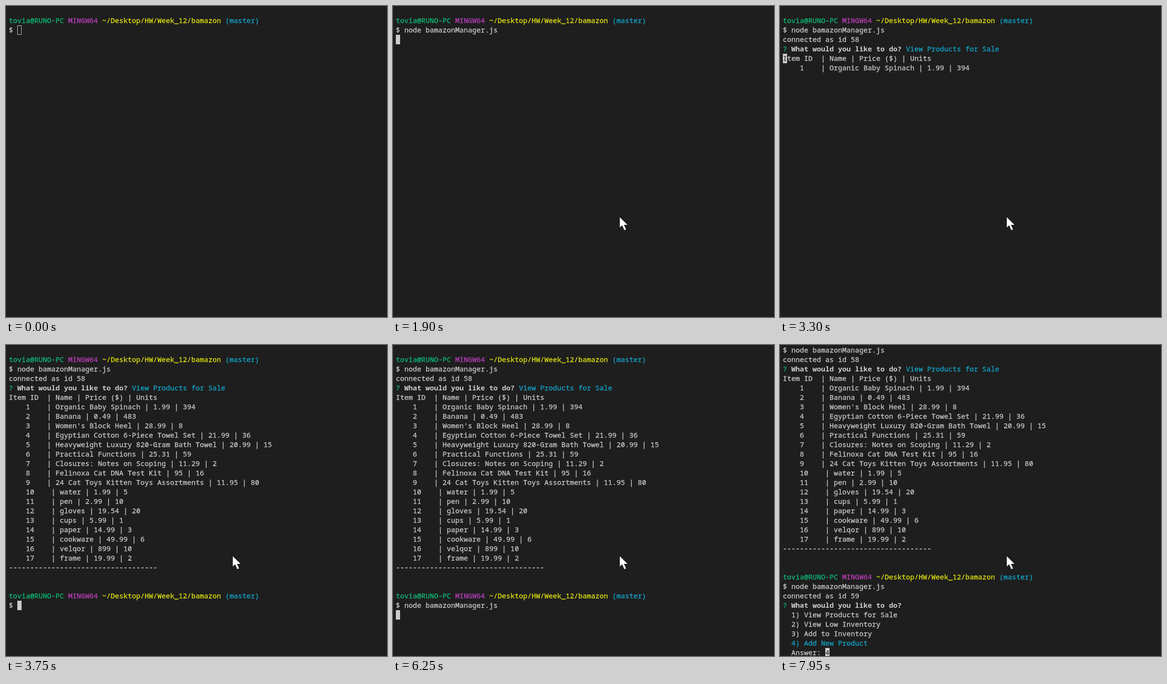
These frames come from a looping animation (808 by 658 pixels, 8 s). An HTML page:

```html
<!DOCTYPE html>
<html lang="en">
<head>
<meta charset="utf-8">
<title>Terminal session</title>
<style>
html, body { margin: 0; width: 100%; height: 100%; overflow: hidden; background: #1e1e1e; }
svg { display: block; width: 808px; height: 658px; }
text { font: 15px "Noto Sans Mono", "DejaVu Sans Mono", monospace; white-space: pre; stroke-width: .3px; }
.bold { font-weight: 700; stroke-width: 0; }
</style>
</head>
<body>
<svg viewBox="0 0 808 658">
  <rect width="808" height="658" fill="#1e1e1e"/>
  <g id="screen"></g>
  <rect id="caret"/>
  <text id="under" fill="#1e1e1e"></text>
  <path id="mouse" d="M0 0V21.5L5 17L9.6 27.3L13.2 25.8L8.8 16H16.2Z" fill="#fff"/>
</svg>
<script>
const LOOP = 8000, TICK = 50, CELL = 9, ROW = 20, LEFT = 6;
const WHITE = "#cccccc", GREEN = "#0dbc79", PURPLE = "#bc3fbc", YELLOW = "#e5e510", CYAN = "#11a8cd";
const $ = id => document.getElementById(id);

// A line is a list of [text, colour, bold] parts.
const plain = text => [[text, WHITE]];
const BLANK = plain("");
const PROMPT = [["tovia@RUNO-PC ", GREEN], ["MINGW64 ", PURPLE],
  ["~/Desktop/HW/Week_12/bamazon ", YELLOW], ["(master)", CYAN]];
const COMMAND = "$ node bamazonManager.js";
const QUESTION = [["? ", GREEN], ["What would you like to do? ", WHITE, true]];
const CHOICES = ["View Products for Sale", "View Low Inventory", "Add to Inventory", "Add New Product"];
const PRODUCTS = `Organic Baby Spinach | 1.99 | 394
Banana | 0.49 | 483
Women's Block Heel | 28.99 | 8
Egyptian Cotton 6-Piece Towel Set | 21.99 | 36
Heavyweight Luxury 820-Gram Bath Towel | 20.99 | 15
Practical Functions | 25.31 | 59
Closures: Notes on Scoping | 11.29 | 2
Felinoxa Cat DNA Test Kit | 95 | 16
24 Cat Toys Kitten Toys Assortments | 11.95 | 80
water | 1.99 | 5
pen | 2.99 | 10
gloves | 19.54 | 20
cups | 5.99 | 1
paper | 14.99 | 3
cookware | 49.99 | 6
velqor | 899 | 10
frame | 19.99 | 2`.split("\n");

const TABLE = [plain("Item ID  | Name | Price ($) | Units"),
  ...PRODUCTS.map((item, i) => plain(`    ${i + 1}    | ${item}`))];
const ANSWERED = [...QUESTION, [CHOICES[0], CYAN]];

const menu = (active, answer) => [QUESTION,
  ...CHOICES.map((c, i) => [[`  ${i + 1}) ${c}`, i + 1 === active ? CYAN : WHITE]]),
  plain("  Answer: " + answer)];

// Event times of the session in ms
const AT = { focus: 800, recall: 1300, enter: 1800, menu: 2500, pick: 2900, list: 3300,
  table: 3350, prompt: 3500, recall2: 4700, enter2: 6150, menu2: 6850, pick2: 7400 };

function session(t) {
  const lines = [BLANK, PROMPT, plain(t < AT.recall ? "$ " : COMMAND)];
  const end = col => ({ lines, row: lines.length - 1, col });
  const add = (...more) => lines.push(...more);

  if (t < AT.recall) return end(2);
  if (t < AT.enter) return end(COMMAND.length);
  if (t < AT.menu) { add(BLANK); return end(0); }
  add(plain("connected as id 58"));
  if (t < AT.list) {
    add(...menu(1, t < AT.pick ? "" : "1"));
    return end(10);
  }
  add(ANSWERED);
  if (t < AT.table) {
    add(...TABLE.slice(0, 2));
    return { lines, row: 5, col: 0 };
  }
  add(...TABLE, plain("-".repeat(35)), BLANK, BLANK);
  if (t < AT.prompt) return end(0);
  add(PROMPT, plain(t < AT.recall2 ? "$ " : COMMAND));
  if (t < AT.recall2) return end(2);
  if (t < AT.enter2) return end(COMMAND.length);
  if (t < AT.menu2) { add(BLANK); return end(0); }
  add(plain("connected as id 59"), ...(t < AT.pick2 ? menu(1, "") : menu(4, "4")));
  return end(10);
}

const ROWS = 33;
const colX = col => LEFT + col * CELL;
const baseline = row => row * ROW + 16;
const setAll = (el, attrs) => { for (const k in attrs) el.setAttribute(k, attrs[k]); };

function drawLine(parts, row) {
  let col = 0;
  return parts.map(([text, color, bold]) => {
    const x = colX(col);
    col += text.length;
    return `<text x="${x}" y="${baseline(row)}" fill="${color}" stroke="${color}"${bold ? ' class="bold"' : ""}>${text}</text>`;
  }).join("");
}

function drawCaret(lines, row, col, scroll, focused) {
  const x = colX(col), y = (row - scroll) * ROW + 1;
  setAll($("caret"), focused
    ? { x, y, width: 9, height: 20, fill: WHITE, stroke: "none" }
    : { x: x + .5, y: y + .5, width: 8, height: 19, fill: "none", stroke: WHITE });
  setAll($("under"), { x, y: baseline(row - scroll) });
  const char = lines[row].map(p => p[0]).join("")[col] || "";
  $("under").textContent = char;
  // Cover the light glyph edges beneath the block
  if (char) setAll($("caret"), { fill: WHITE });
}

function drawMouse(t) {
  const p = Math.min(1, Math.max(0, (t - 50) / 650));
  const left = (1 - p) ** 2;
  setAll($("mouse"), {
    transform: `translate(${481 + 53 * left} ${447 + 179 * left})`,
    visibility: t < 50 ? "hidden" : "visible"
  });
}

let shown = -1;
function draw(t) {
  if (t === shown) return;
  shown = t;
  const { lines, row, col } = session(t);
  const scroll = Math.max(0, lines.length - ROWS);
  $("screen").innerHTML = lines.slice(scroll).map(drawLine).join("");
  drawCaret(lines, row, col, scroll, t >= AT.focus);
  drawMouse(t);
}

const start = performance.now();
function tick() {
  const t = (performance.now() - start) % LOOP;
  draw(Math.floor(t / TICK) * TICK);
  requestAnimationFrame(tick);
}
tick();
</script>
</body>
</html>
```
